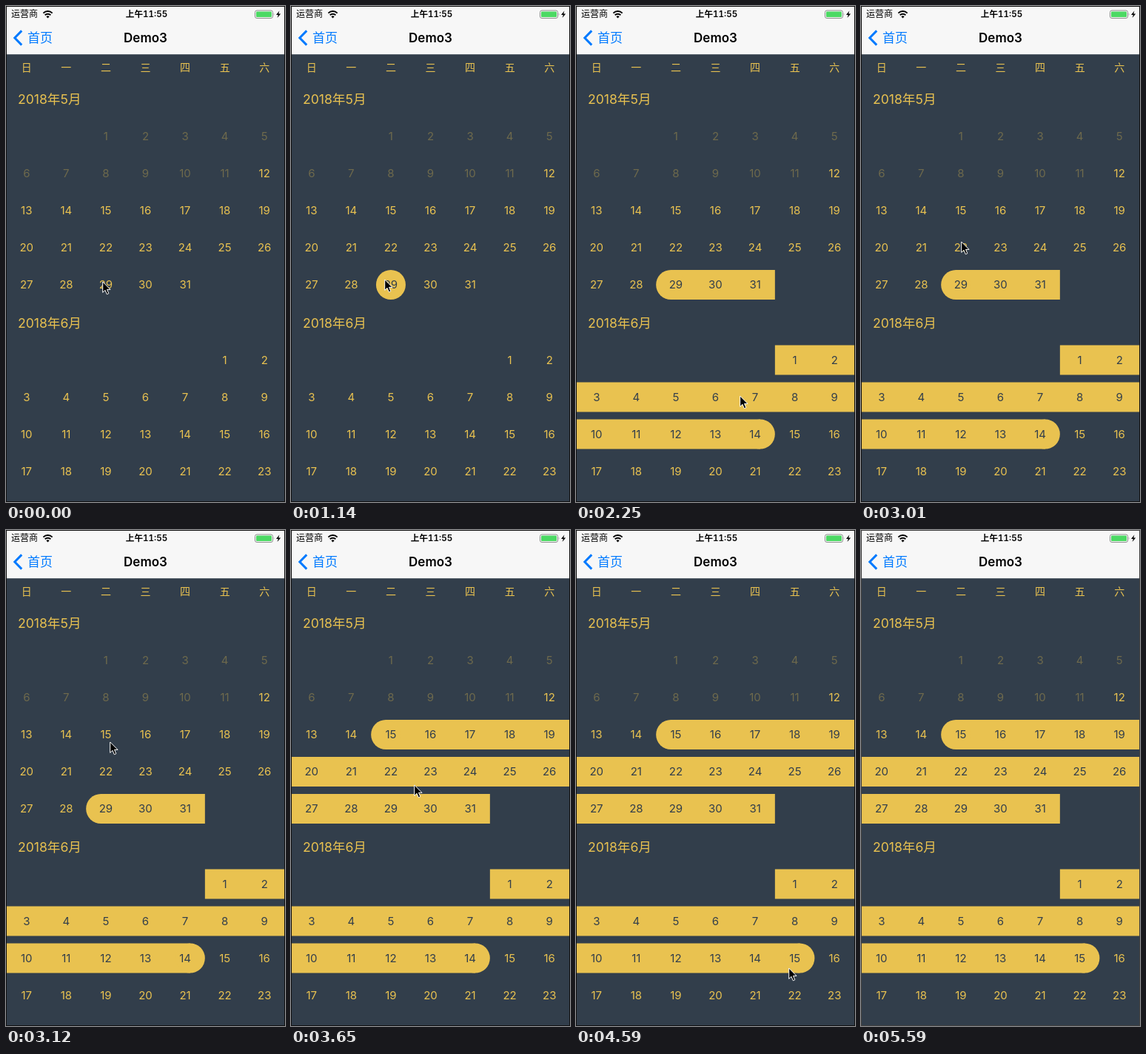
Write an HTML page that moves like this. It is 377x669 px and loops after 5.69 s.

```html
<!DOCTYPE html>
<html lang="zh">
<head>
<meta charset="utf-8">
<title>Demo3</title>
<style>
  html, body { margin: 0; width: 100%; height: 100%; overflow: hidden; }
  #stage {
    --bg: #323e4b;
    --gold: #e9c250;
    position: relative; width: 377px; height: 669px; overflow: hidden;
    background: var(--bg); color: var(--gold);
    font: 15px/40px Inter, "Noto Sans CJK SC", "Noto Sans CJK", sans-serif;
  }
  #stage > * { position: absolute; white-space: nowrap; }
  #bar { left: 0; top: 0; width: 377px; height: 65px; background: #f7f7f7; border-bottom: 1px solid #5a646e; }
  #frame { inset: 0; border: 1px solid #111; }
  #frame.idle { border-color: #3f3f3f; }
  .label { height: 20px; line-height: 20px; }
  .mid { left: 0; width: 377px; text-align: center; color: #000; font-weight: 600; }
  .carrier { left: 7px; top: 1px; font-size: 12px; color: #000; }
  .clock { top: 1px; left: 1.5px; font-size: 11.6px; font-variant-numeric: tabular-nums; }
  .back { left: 29px; top: 33px; font-size: 17px; color: #007aff; }
  .title { top: 33px; font-size: 17px; }
  .month { left: 16px; font-size: 17.6px; }
  .week { top: 73px; font-size: 14px; text-align: center; }
  .day { height: 40px; text-align: center; }
  .past { color: rgba(233, 194, 80, .33); }
  .on { color: var(--bg); }
  svg { left: 0; top: 0; }
  #range { fill: var(--gold); }
  #band { stroke: var(--gold); stroke-width: 40; fill: none; }
</style>
</head>
<body>
<div id="stage">
  <svg id="range" width="377" height="669">
    <path id="band"/>
    <circle id="head"/>
    <circle id="tail"/>
  </svg>
  <div id="bar"></div>
  <div class="label carrier">运营商</div>
  <div class="label mid clock">上午11:55</div>
  <div class="label back">首页</div>
  <div class="label mid title">Demo3</div>
  <svg width="377" height="65" fill="none">
    <g stroke="#000" stroke-width="2">
      <path d="M50.4 9.6a8.7 8.7 0 0 1 12.2 0"/>
      <path d="M52.7 12.2a5.4 5.4 0 0 1 7.6 0"/>
    </g>
    <path d="M56.5 16.4l-2.1-2.2a3 3 0 0 1 4.2 0z" fill="#000"/>
    <rect x="336.5" y="6" width="24" height="10.5" rx="2.5" stroke="#8e8e8e"/>
    <rect x="338" y="7.5" width="21" height="7.5" rx="1.2" fill="#4cd964"/>
    <path d="M361.8 9.3q1.5 2 0 4z" fill="#8e8e8e"/>
    <path d="M369.4 6.4l-4.4 5.6h2.8l-1.2 4 4.6-5.6h-2.9z" fill="#000"/>
    <path d="M21.2 33.4l-9.4 9.6 9.4 9.6" stroke="#007aff" stroke-width="3"/>
  </svg>
  <div class="label month" style="top:116px">2018年5月</div>
  <div class="label month" style="top:418px">2018年6月</div>
</div>
<script>
const LOOP = 5690;
const STEP = 57;
const COL = 375 / 7;
const RADIUS = 20;
const TODAY = 12;
const MAY_DAYS = 31;
const $ = id => document.getElementById(id);
const stage = $('stage');

function add(cls, text, left) {
  const el = document.createElement('div');
  el.className = cls;
  el.textContent = text;
  el.style.left = left + 'px';
  el.style.width = COL + 'px';
  stage.append(el);
  return el;
}

const colLeft = col => 1 + col * COL;
[...'日一二三四五六'].forEach((name, i) => add('label week', name, colLeft(i)));

// Days are numbered on from May 1, so June 1 is 32.
const days = [];
function addMonth(count, offset, top, firstActive) {
  for (let d = 1; d <= count; d++) {
    const slot = d - 1 + offset;
    const left = colLeft(slot % 7);
    const y = top + 50 * Math.floor(slot / 7);
    const el = add(d < firstActive ? 'day past' : 'day', d, left);
    el.style.top = y + 'px';
    days.push({ el, left, y: y + RADIUS, rowStart: d === 1 || slot % 7 === 0 });
  }
}
addMonth(MAY_DAYS, 2, 156, TODAY);
addMonth(23, 5, 457.5, 0);

stage.insertAdjacentHTML('beforeend', `
  <div id="frame"></div>
  <svg id="cursor" width="14" height="20">
    <path d="M.7 1V15.4L4 12.3 6.3 17.8 8.8 16.7 6.5 11.4H11Z" fill="#000" stroke="#fff"/>
  </svg>`);

// Each tap widens the selected range to include its day.
const taps = [
  { at: 780, day: 29 },
  { at: 1600, day: MAY_DAYS + 7 },
  { at: 1890, day: MAY_DAYS + 14 },
  { at: 3240, day: 15 },
  { at: 4530, day: MAY_DAYS + 15 }
];

const home = { x: 130, y: 371 };
const hops = [
  { from: 1140, to: 1140, x: 126, y: 368, ease: 1 },
  { from: 1380, to: 1890, x: 249, y: 571, ease: 5 },
  { from: 2190, to: 2770, x: 127, y: 371, ease: 1.3 },
  { from: 2950, to: 3240, x: 142, y: 274, ease: 2 },
  { from: 3590, to: 4180, x: 246, y: 573, ease: 1.3 },
  { from: 4360, to: 4750, x: 288, y: 590, ease: 4 },
  { from: 5050, to: 5220, x: 350, y: 700, ease: 1 }
];

// The pointer moves in even time steps along each eased hop.
function cursorAt(t) {
  let { x, y } = home;
  for (const hop of hops) {
    if (t < hop.from) break;
    const count = 1 + Math.round((hop.to - hop.from) / STEP);
    const k = Math.min(count, 1 + Math.floor((t - hop.from + 10) / STEP));
    const p = 1 - (1 - k / count) ** hop.ease;
    x += (hop.x - x) * p;
    y += (hop.y - y) * p;
  }
  return [Math.round(x), Math.round(y)];
}

function setCap(id, x, y, shown) {
  const cap = $(id);
  cap.setAttribute('cx', x);
  cap.setAttribute('cy', y);
  cap.setAttribute('r', shown ? RADIUS : 0);
}

let tapped = -1;
function select(count) {
  if (count === tapped) return;
  tapped = count;
  const picked = taps.slice(0, count).map(tap => tap.day);
  const from = Math.min(...picked);
  const to = Math.max(...picked);
  const inset = from === to ? COL / 2 : RADIUS;
  let path = '';
  days.forEach(({ el, left, y, rowStart }, i) => {
    const d = i + 1;
    const on = d >= from && d <= to;
    el.classList.toggle('on', on);
    if (!on) return;
    const x0 = d === from ? left + inset : left;
    const x1 = d === to ? left + COL - inset : left + COL;
    if (d === from || rowStart) path += `M${x0} ${y}`;
    path += `H${x1}`;
    if (d === from) setCap('head', x0, y, true);
    if (d === to) setCap('tail', x1, y, from < to);
  });
  $('band').setAttribute('d', path);
  if (!count) ['head', 'tail'].forEach(id => setCap(id, 0, 0, false));
}

function draw(t) {
  select(taps.filter(tap => tap.at <= t).length);
  const [x, y] = cursorAt(t);
  $('cursor').style.transform = `translate(${x}px, ${y}px)`;
  $('frame').classList.toggle('idle', t >= 5590);
}

let begin = null;
function tick(now) {
  if (begin === null) begin = now;
  draw((now - begin) % LOOP);
  requestAnimationFrame(tick);
}
draw(0);
requestAnimationFrame(tick);
</script>
</body>
</html>
```
